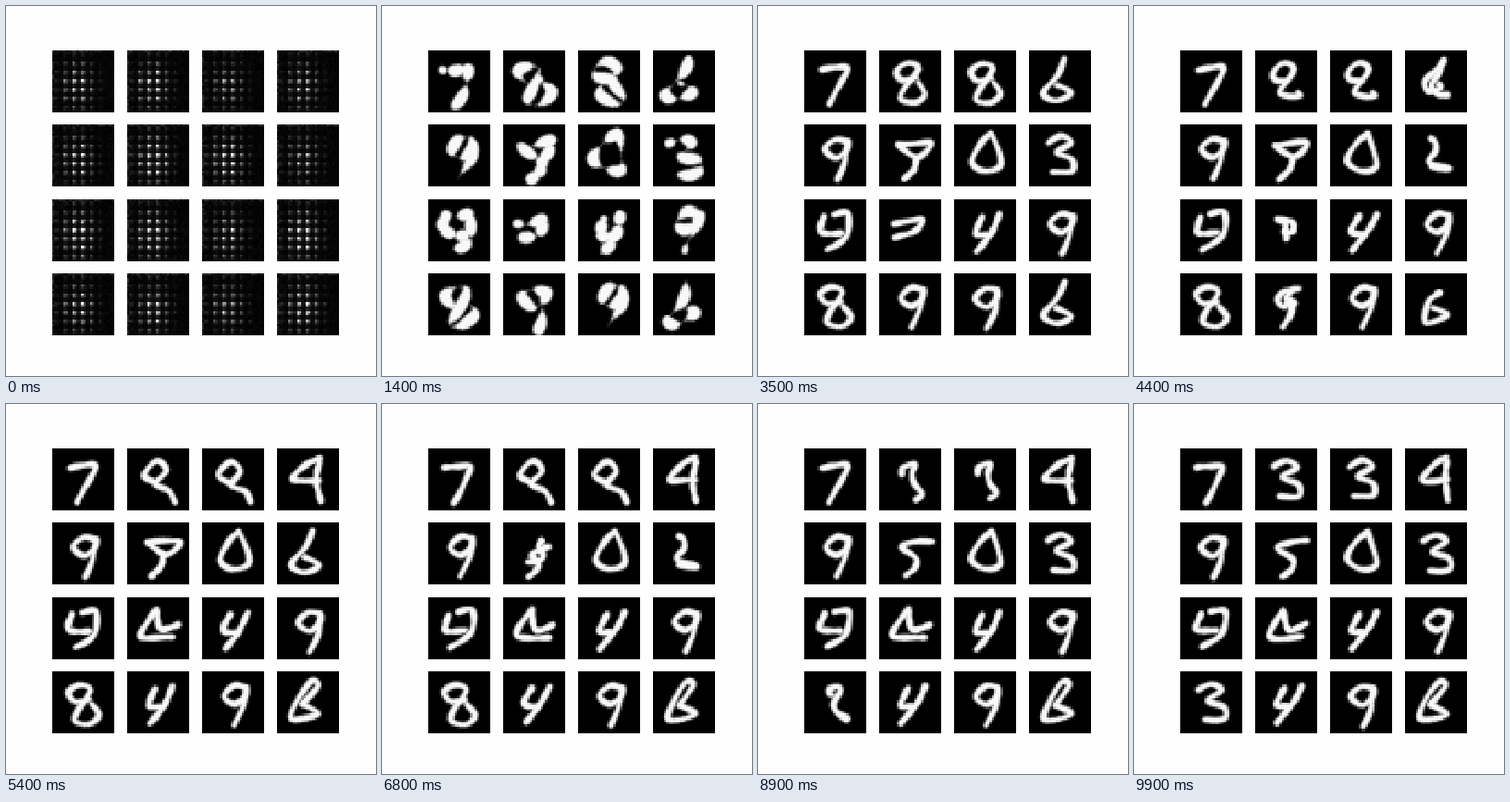
These frames come from a looping animation (400 by 400 pixels, 10 s). An HTML page with a canvas:

```html
<!DOCTYPE html>
<html lang="en">
<head>
<meta charset="utf-8">
<title>Handwritten digits taking shape</title>
<style>
html, body { margin: 0; width: 100%; height: 100%; overflow: hidden; background: #fefefe; }
canvas { display: block; }
</style>
</head>
<body>
<canvas id="stage" width="400" height="400"></canvas>
<script>
const CELLS = 28, SIZE = 67, SAMPLES = 32, FORMED = 35;

// Key points of each handwritten form, strokes split by "|"
const glyphs = {
  7: '18,21 32,19 46,19 40,35 27,59',
  8: '40,30 24,32 18,22 30,14 42,20 28,40 24,53 40,57 50,48 42,35',
  9: '47,18 34,16 23,27 35,36 47,26 47,18 44,40 35,59',
  3: '20,20 34,13 45,20 30,31 47,38 47,51 26,52',
  4: '46,10 32,17 18,34 46,34|46,14 43,34 47,57',
  5: '57,20 40,21 24,27 40,39 39,50 29,58',
  0: '40,10 28,21 19,40 34,51 51,43 40,10',
  6: '38,9 30,28 16,46 30,55 46,46 30,38',
  Q: '30,37 18,29 31,14 42,24 31,39 46,46 52,58',
  Y: '21,22 56,20 42,35 21,22|40,36 37,48 26,59',
  E: '22,18 18,35 40,36|32,16 48,15 45,40 24,54',
  a: '31,13 15,42 50,43|31,15 36,35 55,29',
  y: '31,18 23,36 38,38|50,16 40,36 24,56',
  z: '17,27 46,21 40,33 17,42',
  b: '28,36 44,15 34,13 15,51 45,46 28,36'
};

// Forms of the sixteen tiles, row by row, as training goes on
const stages = [
  { step: FORMED, forms: '7886' + '9Y03' + 'Ezy9' + '8996' },
  { step: 54, forms: '7QQ4' + '9Y06' + 'Eay9' + '8y9b' },
  { step: 79, forms: '7QQ4' + '9503' + 'Eay9' + '8y9b' },
  { step: 99, forms: '7334' + '9503' + 'Eay9' + '3y9b' }
];

const mix = (a, b, t) => a + (b - a) * t;
const hash = n => { const s = Math.sin(n * 12.9898) * 43758.5453; return s - Math.floor(s); };

// Catmull-Rom curve through the points, sampled evenly
function smooth(text) {
  const pts = text.split(' ').map(p => p.split(',').map(Number));
  const last = pts.length - 1;
  const at = i => pts[Math.max(0, Math.min(last, i))];
  return Array.from({ length: SAMPLES }, (_, k) => {
    const s = k / (SAMPLES - 1) * last, i = Math.floor(s), t = s - i;
    return [0, 1].map(d => {
      const [a, b, c, e] = [-1, 0, 1, 2].map(n => at(i + n)[d]);
      return b + t / 2 * (c - a + t * (2 * a - 5 * b + 4 * c - e + t * (3 * (b - c) + e - a)));
    });
  });
}

const curves = {};
for (const name in glyphs) curves[name] = glyphs[name].split('|').map(smooth);

const stage = document.getElementById('stage').getContext('2d');
stage.imageSmoothingEnabled = false;
const small = document.createElement('canvas');
small.width = small.height = CELLS;
const pen = small.getContext('2d');
pen.lineCap = 'round';

// Dotted lattice of the untrained first step
function lattice(index, alpha) {
  const glow = .7 + .7 * hash(index + 5);
  const ripple = n => Math.max(0, Math.cos((n - 1.3) * Math.PI / 2)) + .12;
  for (let y = 0; y < CELLS; y++) for (let x = 0; x < CELLS; x++) {
    const noise = hash(index * 800 + y * CELLS + x + 1);
    const env = Math.exp(-(((x - 11) / 7) ** 2) - ((y - 15) / 10) ** 2);
    const edge = (x && y ? .03 : .2) * noise;
    const v = glow * env * ripple(x) * ripple(y) * (.6 + .6 * noise) + edge;
    pen.fillStyle = `rgba(255,255,255,${Math.min(1, v) * alpha})`;
    pen.fillRect(x, y, 1, 1);
  }
}

// The two forms a tile is between, blended point by point
function blend(index, step) {
  const k = Math.max(1, stages.findIndex(s => s.step >= step));
  const [a, b] = [stages[k - 1], stages[k]];
  const t = Math.max(0, (step - a.step) / (b.step - a.step));
  const [from, to] = [a, b].map(s => curves[s.forms[index]]);
  const count = t === 0 ? from.length : t === 1 ? to.length : Math.max(from.length, to.length);
  return Array.from({ length: count }, (_, i) => {
    const end = to[i % to.length];
    return from[i % from.length].map((p, n) => p.map((v, d) => mix(v, end[n][d], t)));
  });
}

// Early strokes break into swaying blobs; later ones settle to an even line
function strokes(index, step) {
  const raw = Math.max(0, 1 - step / FORMED);
  const sway = .7 + 4 * raw;
  const phase = 6.3 * hash(index * 101 + step + 1);
  const warp = ([x, y]) => [
    x + sway * Math.sin(phase + y / 9),
    y + sway * Math.cos(phase + x / 9)
  ];
  const lines = blend(index, step).map(line => line.map(warp));

  pen.save();
  pen.scale(CELLS / SIZE, CELLS / SIZE);
  pen.globalAlpha = Math.min(1, step / 6);
  for (const [color, extra] of [['#777', 1.2], ['#f8f8f8', -1.6]]) {
    pen.strokeStyle = color;
    lines.forEach((line, i) => line.slice(1).forEach((p, n) => {
      const wave = Math.sin(phase + i * 2 + n * .65);
      const width = 6.2 + extra + wave * (.9 + 10 * raw);
      if (width <= 0) return;
      pen.lineWidth = width;
      pen.beginPath();
      pen.moveTo(...line[n]);
      pen.lineTo(...p);
      pen.stroke();
    }));
  }
  pen.restore();
}

function draw(step) {
  stage.fillStyle = '#fefefe';
  stage.fillRect(0, 0, 400, 400);
  for (let i = 0; i < 16; i++) {
    pen.fillStyle = '#000';
    pen.fillRect(0, 0, CELLS, CELLS);
    if (step < 4) lattice(i, 1 - step / 4);
    if (step) strokes(i, step);
    stage.drawImage(small, 50 + 81 * (i % 4), Math.round(48 + 80.4 * Math.floor(i / 4)), SIZE, SIZE);
  }
}

const start = performance.now();
let shown = -1;
function tick() {
  const step = Math.floor((performance.now() - start) / 100) % 100;
  if (step !== shown) draw(shown = step);
  requestAnimationFrame(tick);
}
tick();
</script>
</body>
</html>
```
